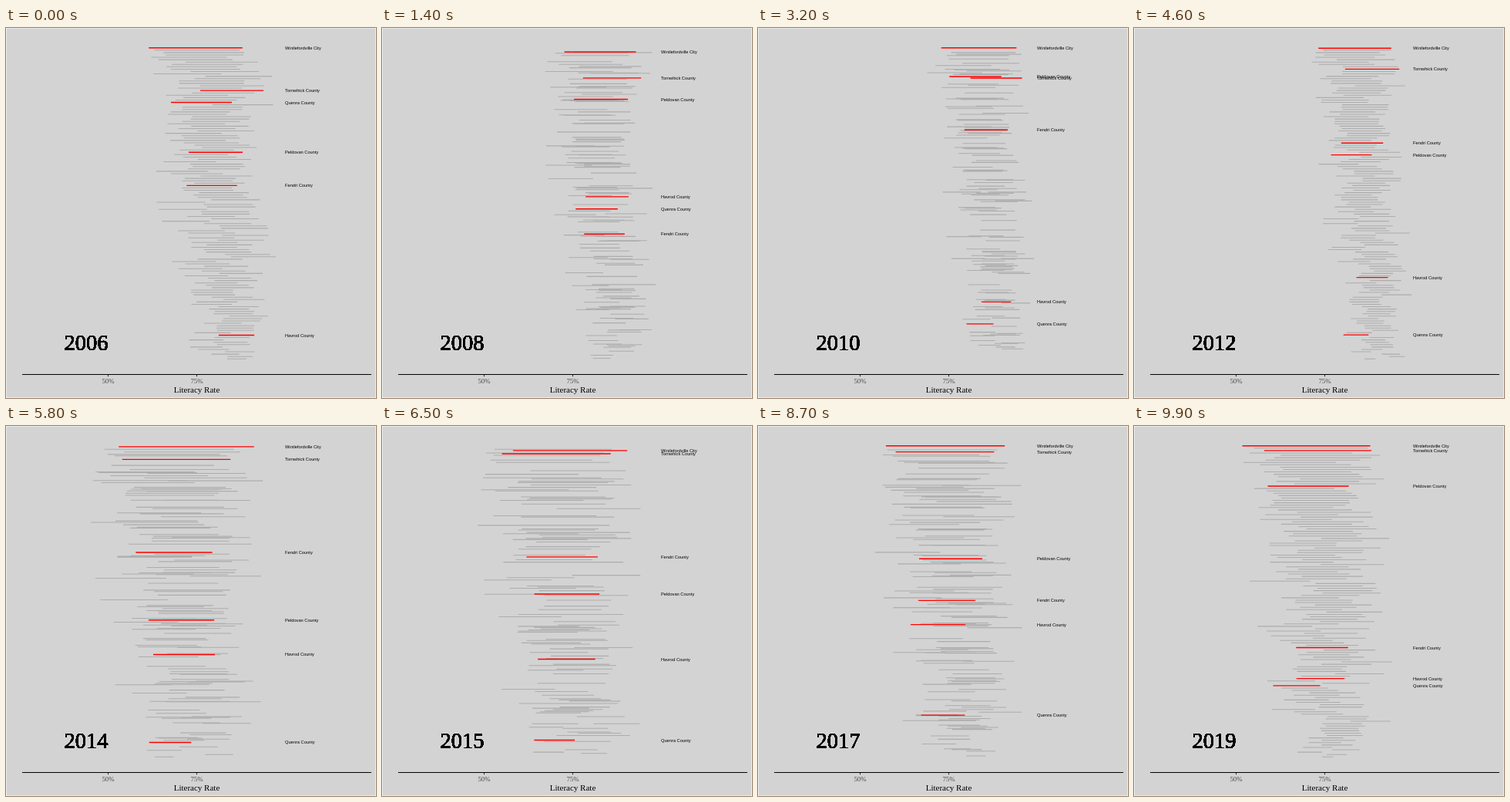
Animation of 480 by 480 pixels, one loop 10 s. Source, as an HTML page:

```html
<!DOCTYPE html>
<html lang="en">
<head>
<meta charset="utf-8">
<title>Literacy Rate</title>
<style>
html, body { margin: 0; width: 100%; height: 100%; overflow: hidden; background: #d3d3d3; }
svg { display: block; width: 100vw; height: 100vh; }
path, rect { fill: none; stroke-width: 1.07; }
.serif { font-family: "Liberation Serif", Times, serif; text-anchor: middle; }
#red { stroke-width: 1.4; }
#labels { font: 5.69px "Liberation Sans", Arial, sans-serif; }
#year { font-size: 28.45px; }
</style>
</head>
<body>
<svg viewBox="0 0 480 480">
  <!-- Hard edges, as if the text were printed many times in one place -->
  <filter id="solid"><feComponentTransfer><feFuncA type="linear" slope="20"/></feComponentTransfer></filter>
  <rect width="480" height="480" stroke="#fff"/>
  <path id="grey" stroke="#adadad"/>
  <path id="red" stroke="#f00"/>
  <g id="labels"></g>
  <text id="year" class="serif" x="104" y="418" filter="url(#solid)"></text>
  <path d="M132.5 449.5v2.75M247.5 449.5v2.75" stroke="#333"/>
  <path d="M21 449.5H474" stroke="#000"/>
  <g class="serif">
    <g font-size="8.8" fill="#4d4d4d"><text x="132.5" y="461.3">50%</text><text x="247.5" y="461.3">75%</text></g>
    <text x="247.5" y="472.6" font-size="11">Literacy Rate</text>
  </g>
</svg>
<script>
const $ = id => document.getElementById(id);
const FRAMES = 100, YEARS = 14, ROWS = 132;

// Key steps, and at each of them the typical length, its spread and the typical centre
const knots = [0, 14, 32, 58, 73, 87, 99];
const typical = [63, 55, 47, 88, 77, 74, 74];
const spread = [10.5, 9.3, 9.1, 17.5, 15.5, 14.4, 16.5];
const middle = [273, 286, 300, 224, 250, 255, 245];

// Rank by length and centre of each highlighted bar at the key steps
const places = [
  { name: "Wintlefordville City", rank: [0, 1.71, 0, .38, 3.86, 0, 0],
    centre: [246, 283, 286.5, 234, 255.5, 243, 223.5] },
  { name: "Tornwhick County", rank: [18, 12.71, 12.75, 5.75, .57, 2.57, 2],
    centre: [293, 298.5, 309, 221, 232, 242.5, 238.5] },
  { name: "Quenra County", rank: [23, 67.86, 116.25, 124.88, 122.86, 113.43, 101],
    centre: [253.5, 278.5, 288, 213, 236, 240, 211] },
  { name: "Peldovan County", rank: [44, 21.71, 12.13, 73.38, 49.86, 47.57, 17],
    centre: [272, 284, 282, 227.5, 254, 250, 226] },
  { name: "Fendri County", rank: [58, 78.43, 34.5, 44.88, 49, 65.14, 85],
    centre: [267, 288.5, 296, 218, 251.5, 245, 244] },
  { name: "Havrod County", rank: [121, 62.71, 107, 87.88, 92.14, 75.29, 98],
    centre: [299, 292, 309, 231, 249, 233.5, 242] },
];

let seed = 7;
const random = () => (seed = seed * 16807 % 2147483647) / 2147483647;
const mix = (a, b, u) => a + (b - a) * u;

function at(t, values) {
  let i = 1;
  while (t > knots[i]) i++;
  return mix(values[i - 1], values[i], (t - knots[i - 1]) / (knots[i] - knots[i - 1]));
}

// Rates drop sharply within one year, between steps 46 and 53
const rateTime = t => t < 32 || t > 58 ? t : 32 + 26 * Math.min(1, Math.max(0, (t - 46) / 7));
const rateAt = (t, values) => at(rateTime(t), values);

const yearStep = k => Math.round(k * (FRAMES - 1) / (YEARS - 1));
const rowY = rank => 25.68 + 3.081 * rank;

// Lengths follow a logistic curve down the ranking, flatter in the lower half
function lengthOf(rank, t) {
  const p = (rank + .5) / ROWS, q = Math.log((1 - p) / p);
  return rateAt(t, typical) + rateAt(t, spread) * q * (q > 0 ? 1 : .65);
}

function bar(rank, centre, t) {
  const half = lengthOf(rank, t) / 2;
  return [centre - half, centre + half, rowY(rank)];
}

// Each year the grey bars are ranked anew in the rows the highlighted ones leave free
const greys = Array.from({ length: ROWS - places.length }, (_, i) => ({
  score: i, shift: (random() + random() + random() - 1.5) * .56, keys: [],
}));
for (let k = 0; k < YEARS; k++) {
  const t = yearStep(k);
  const taken = new Set(places.map(p => Math.round(at(t, p.rank))));
  const free = [...Array(ROWS).keys()].filter(row => !taken.has(row));
  greys.forEach(g => g.score += (random() - .5) * 60);
  [...greys].sort((a, b) => a.score - b.score).forEach((g, i) => {
    g.score = i;
    const slope = 30 * (free[i] / ROWS - .5);
    const centre = rateAt(t, middle) + slope + g.shift * rateAt(t, typical);
    g.keys.push(bar(free[i], centre, t));
  });
}

const labels = places.map(p => {
  const text = document.createElementNS("http://www.w3.org/2000/svg", "text");
  text.textContent = p.name;
  text.setAttribute("x", 362);
  return $("labels").appendChild(text);
});

const line = ([l, r, y]) => `M${l.toFixed(2)} ${y.toFixed(2)}H${r.toFixed(2)}`;

function draw(t) {
  let k = 0;
  while (k < YEARS - 2 && t >= yearStep(k + 1)) k++;
  const u = (t - yearStep(k)) / (yearStep(k + 1) - yearStep(k));
  $("grey").setAttribute("d", greys.map(({ keys }) =>
    line(keys[k].map((v, i) => mix(v, keys[k + 1][i], u)))).join(""));

  $("red").setAttribute("d", places.map((p, i) => {
    const rank = at(t, p.rank);
    labels[i].setAttribute("y", rowY(rank) + 2.05);
    return line(bar(rank, rateAt(t, p.centre), t));
  }).join(""));

  $("year").textContent = 2006 + Math.round(t * (YEARS - 1) / (FRAMES - 1));
}

const start = performance.now();
function tick() {
  draw(Math.floor((performance.now() - start) / 100) % FRAMES);
  requestAnimationFrame(tick);
}
tick();
</script>
</body>
</html>
```
